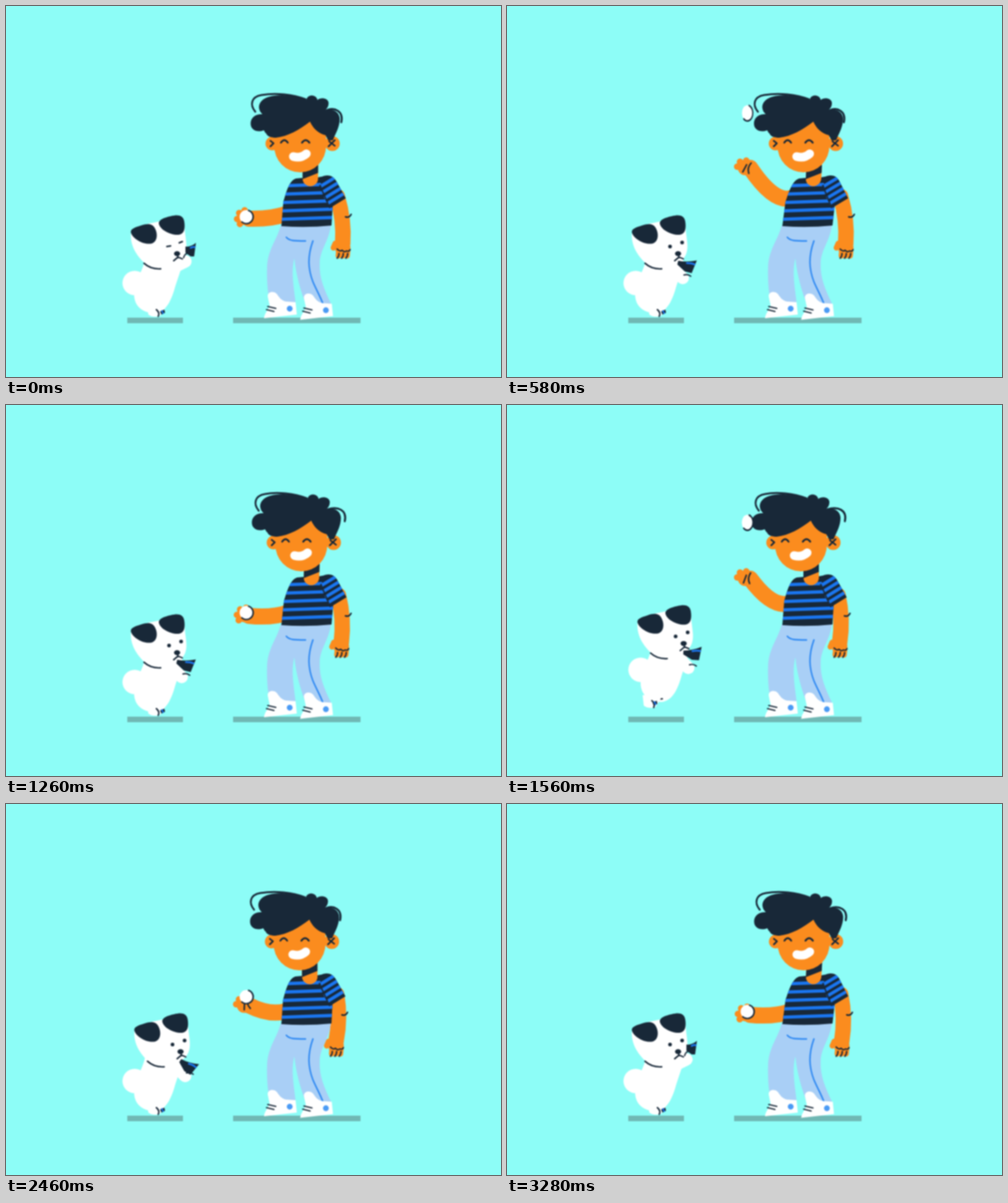
Animation of 800x600 px, one loop 3.3 s. Source, as an HTML page with a canvas:

```html
<!DOCTYPE html>
<html lang="en">
<head>
<meta charset="utf-8">
<title>Playing catch</title>
<style>
  html, body { margin: 0; width: 100%; height: 100%; overflow: hidden; background: #8dfdf7; }
  canvas { display: block; filter: blur(.8px); }
</style>
</head>
<body>
<canvas id="stage" width="800" height="600"></canvas>
<script>
const ctx = document.getElementById('stage').getContext('2d');
const LOOP = 3300, THROW = 1100;
const SKY = '#8dfdf7', GROUND = '#70b8b4', NAVY = '#182838', SKIN = '#fb8c1e',
      BLUE = '#1a76f0', DENIM = '#a9cff6', SEAM = '#2d88f2', WHITE = '#fff';

const clamp = s => Math.min(Math.max(s, 0), 1);
const smooth = s => (s = clamp(s), s * s * (3 - 2 * s));
const mix = (a, b, s) => a + (b - a) * s;
const bump = (t, center, width) => Math.max(0, 1 - ((t - center) / width) ** 2);
const wave = (t, period, peak) => Math.cos((t - peak) / period * 2 * Math.PI);

// Boy: one toss per THROW; reach runs from 0 (low) to 1 (hand up)
const RELEASE = 300, APEX = 605, CATCH = 955;
const reachAt = p => p < 640 ? smooth((p - 100) / 540) : 1 - clamp((p - 640) / 450) ** 1.8;
const handY = reach => 341 - 85 * reach;

function ballAt(p, reach) {
  if (p < RELEASE || p > CATCH) return { y: handY(reach) - Math.min(11, 60 * reach), squash: 0 };
  const span = p < APEX ? APEX - RELEASE : 385;
  const drop = (Math.abs(p - APEX) / span) ** 2.7;
  return { y: 173 + 129 * drop, squash: .2 * (1 - drop) };
}

// Dog: two hops, a crouch, and a paw held up around the loop point
const hopAt = t => bump(t, 940, 280) + bump(t, 1590, 290) - .33 * bump(t, 2060, 190);
const lookAt = t => bump(t, 2200, 700);
const liftAt = t => smooth(1 - Math.min(t, LOOP - t) / 550);

function fill(d, color) {
  ctx.fillStyle = color;
  ctx.fill(new Path2D(d));
}
function line(d, color = NAVY, width = 2.6) {
  ctx.strokeStyle = color;
  ctx.lineWidth = width;
  ctx.stroke(new Path2D(d));
}
function dot(x, y, r, color, ry = r) {
  ctx.fillStyle = color;
  ctx.beginPath();
  ctx.ellipse(x, y, r, ry, 0, 0, 7);
  ctx.fill();
}
function group(x, y, draw, angle = 0) {
  ctx.save();
  ctx.translate(x, y);
  ctx.rotate(angle);
  draw();
  ctx.restore();
}
function striped(outline, count, stripe) {
  fill(outline, NAVY);
  ctx.save();
  ctx.clip(new Path2D(outline));
  for (let i = 0; i < count; i++) line(stripe(i), BLUE, 5.4);
  ctx.restore();
}

function shoe() {
  fill('M423 470C422 462 433 460 438 466C442 472 446 477 453 478L468 479L470 499L417 505C418 496 424 492 426 484Z', WHITE);
  line('M423 486L436 489M421 491L433 494', NAVY, 2.2);
  dot(458.5, 489.5, 4.7, '#4a9bf5');
}

function legs() {
  fill('M444 355C438 378 424 392 422 420C421 442 423 462 426 480L468 480C466 458 460 432 466 408' +
       'C469 436 476 460 484 481L526 483C514 458 506 440 507 415C508 393 522 380 525 355Z', DENIM);
  line('M453 374C458 380 466 380 484 380', SEAM, 2.4);
  line('M496 380C487 405 488 425 496 446C502 460 508 470 512 481', SEAM, 2.4);
  shoe();
  group(58.5, 2.5, shoe);
}

function hangingArm(lean, t) {
  const shoulder = 535 + lean, hand = lean + 537 + 5 * wave(t, 4600, 200);
  const elbow = (shoulder + hand) / 2 + 8;
  line(`M${shoulder} 308Q${elbow} 346 ${hand + 2} 384`, SKIN, 25);
  line(`M${elbow + 2} 341q6 2 9 -4`);
  group(hand, 390, () => {
    dot(2, 1, 12.5, SKIN);
    line('M-10 -6L-13 1', SKIN, 9);
    for (let x = -5; x < 12; x += 7) line(`M${x + 1} 4L${x} 14`, SKIN, 9);
    for (let x = -4; x < 12; x += 7) line(`M${x} 10q0 5 -3 8`, NAVY, 2.2);
    line('M-7 3q4 5 8 2q4 4 7 1q4 2 6 -2', NAVY, 2.2);
  });
}

function torso(lean) {
  ctx.save();
  ctx.transform(1, 0, -lean / 81, 1, lean * 356 / 81, 0);
  striped('M468 279C457 283 453 300 448 317L445 356Q486 359 526 355L528 322L510 276L504 277Q490 285 479 278Z',
    5, i => `M440 ${291 + 13.5 * i}l90 -3`);
  striped('M508 277C518 272 528 273 534 284L549 311L523 327L510 302Z',
    4, i => `M${512 - 5 * i} ${324 - 8.5 * i}l44 -27`);
  line('M507 290L523 326', NAVY, 2);
  fill('M479 255H504V279A12.5 12.5 0 0 1 479 279Z', SKIN);
  fill('M479 268L504 257V270L479 280Z', NAVY);
  ctx.restore();
}

function boyHead(lean, t) {
  const sway = 2 + 3 * wave(t, 2300, 1540);
  group(lean, 0, () => {
    dot(430, 222.5, 11, SKIN);
    dot(527, 222.5, 12, SKIN);
    fill('M433 200V226A42 43 0 0 0 517 226V195L491 180Z', SKIN);
    fill('M420 206C417 204 418 202 416 201C406 205 395 201 395 190C395 180 404 174 414 175' +
         'C404 165 408 152 424 147C446 141 468 145 485 152C487 142 501 143 503 152' +
         'C508 147 521 149 521 157C521 163 518 166 516 168C530 166 538 172 539 182' +
         'C539 196 533 204 528 217L521 218L516 209C503 206 495 196 491 187' +
         'C474 200 455 211 436 213C428 213 422 211 420 206Z', NAVY);
    line(`M${402 + sway} 171C${393 + sway} 160 ${395 + sway} 147 ${412 + sway} 144C436 140 464 143 484 151`, NAVY, 3);
    line(`M517 169C${530 + sway} 163 ${545 + sway} 170 ${541 + sway} 188`, NAVY, 3.2);
    line('M444 221Q449.5 213 455 221M478 221Q484 213 490 221', NAVY, 3);
    line('M427 218L432 222L427 227M521 227L531 217M522 219L531 226', NAVY, 2.8);
    line('M464 243.5Q476 247 485 239', WHITE, 14);
  });
}

function throwingArm(lean, reach) {
  const bend = reach * reach;
  line(`M${457 + lean / 2} ${335 - 26 * bend}Q${429 + lean / 2} ${345 - 28 * bend} 393 ${handY(reach) + 3}`, SKIN, 26);
}

function throwingHand(reach) {
  const grip = clamp(1 - reach / .19);
  group(384, handY(reach) + 1, () => {
    dot(1, 2, 12, SKIN);
    for (let i = 0; i < 4; i++) {
      const a = Math.PI + .9 * i;
      line(`M0 0L${12 * Math.cos(a)} ${10 * Math.sin(a)}`, SKIN, 10.5);
    }
  }, -1.05 * grip);
  if (grip < .6) {
    group(384, handY(reach) + 1, () => line('M2 -4L0 9M8 -9Q4 0 10 8', NAVY, 2.5), .6 * (reach - .4));
  }
}

function ball({ y, squash }) {
  ctx.save();
  ctx.translate(388.5, y);
  ctx.scale(1 - squash, 1 + squash * .8);
  dot(0, 0, 11, WHITE);
  ctx.strokeStyle = NAVY;
  ctx.lineWidth = 2.4;
  ctx.beginPath();
  ctx.arc(0, 0, 11, -1.25, 2.3);
  ctx.stroke();
  ctx.restore();
}

function dogBody(hop) {
  const rise = Math.max(hop, 0);
  dot(208 + 8 * hop, 448 - 20 * hop, 19.8, WHITE);
  group(9 * hop, -17 * rise, () => {
    fill('M226 400C224 430 207 440 207 466C207 488 224 497 242 497C260 494 268 474 274 452' +
         'L282 428L287 400Z', WHITE);
  });
  group(-rise, -11 * rise, () => line('M241 483Q245 487 252 486', NAVY, 2.4));
  group(-9 * rise, -13 * rise, () => {
    fill('M228 482L230 499Q238 505 249 501L262 480Z', WHITE);
    line('M243 491Q249 496 246 502', NAVY, 2.4);
    if (hop < -.15) return;
    group(-5 * rise, 0, () => {
      fill('M249 494L256 491L257 496L251 499Z', NAVY);
      line('M252 493L254 497', BLUE, 2.4);
    });
  });
}

function dogPaw(lift, turn) {
  group(mix(276, 290, lift), mix(415, 394, lift), () => {
    const tip = mix(29, 17, lift), heel = mix(3, 5, lift);
    fill(`M0 ${-heel}Q${tip / 2} -4 ${tip} -11L${tip - 3} 11L${tip / 2} 11L0 ${heel}Z`, NAVY);
    line(`M${tip * .5} -3Q${tip * .75} -5 ${tip - 2} -4`, BLUE, 3);
  }, turn);
  line(lift < .5 ? 'M286 435Q292 433 297 437' : 'M287 407Q289 400 294 400', NAVY, 2.2);
}

function dogHead(hop, t) {
  const lift = liftAt(t), look = lookAt(t);
  const shift = 8 * hop + 6.5 * look + 5 * bump(t, 940, 250);
  group(shift, -15 * hop, () => {
    fill('M202 366C200 386 210 402 222 414C236 426 262 426 276 416C290 408 293 396 291 380' +
         'L288 355L265 345L230 352Z', WHITE);
    line(`M268 424L${mix(284, 290, lift)} ${mix(440, 413, lift)}`, WHITE, 20);
    fill('M202 367C200 361 208 358 218 355C230 351 237 352 241 360C246 370 244 381 236 384' +
         'C224 387 206 378 202 367Z', NAVY);
    fill('M247 352C246 346 256 342 266 340C278 337 286 338 288 348C290 360 288 369 279 370' +
         'C266 371 249 362 247 352Z', NAVY);
    if (t < 90) line('M260 389L266 388M280 383L285 381');
    else {
      dot(263.5, 389, 3, NAVY);
      dot(283, 382.5, 3, NAVY);
    }
    dogPaw(lift, .25 * (1 - lift) - .25 * Math.max(hop, 0) + .35 * look);
    dot(276.5, 400.5, 5, NAVY, 4);
    line('M277 402L278 407M271 412L278 406L285 409', NAVY, 2.4);
    line('M223 416Q234 426 250 425', NAVY, 2.4);
  });
}

function draw(t) {
  ctx.fillStyle = SKY;
  ctx.fillRect(0, 0, 800, 600);
  ctx.fillStyle = GROUND;
  ctx.fillRect(196, 504, 90, 9);
  ctx.fillRect(367, 504, 206, 9);
  ctx.lineCap = ctx.lineJoin = 'round';

  const hop = hopAt(t);
  dogBody(hop);
  dogHead(hop, t);

  const lean = 1.2 + 3.2 * wave(t, 2600, 760);
  const p = t % THROW, reach = reachAt(p);
  hangingArm(lean, t);
  legs();
  throwingArm(lean, reach);
  torso(lean);
  boyHead(lean, t);
  throwingHand(reach);
  ball(ballAt(p, reach));
}

function tick() {
  draw(performance.now() % LOOP);
  requestAnimationFrame(tick);
}
tick();
</script>
</body>
</html>
```
